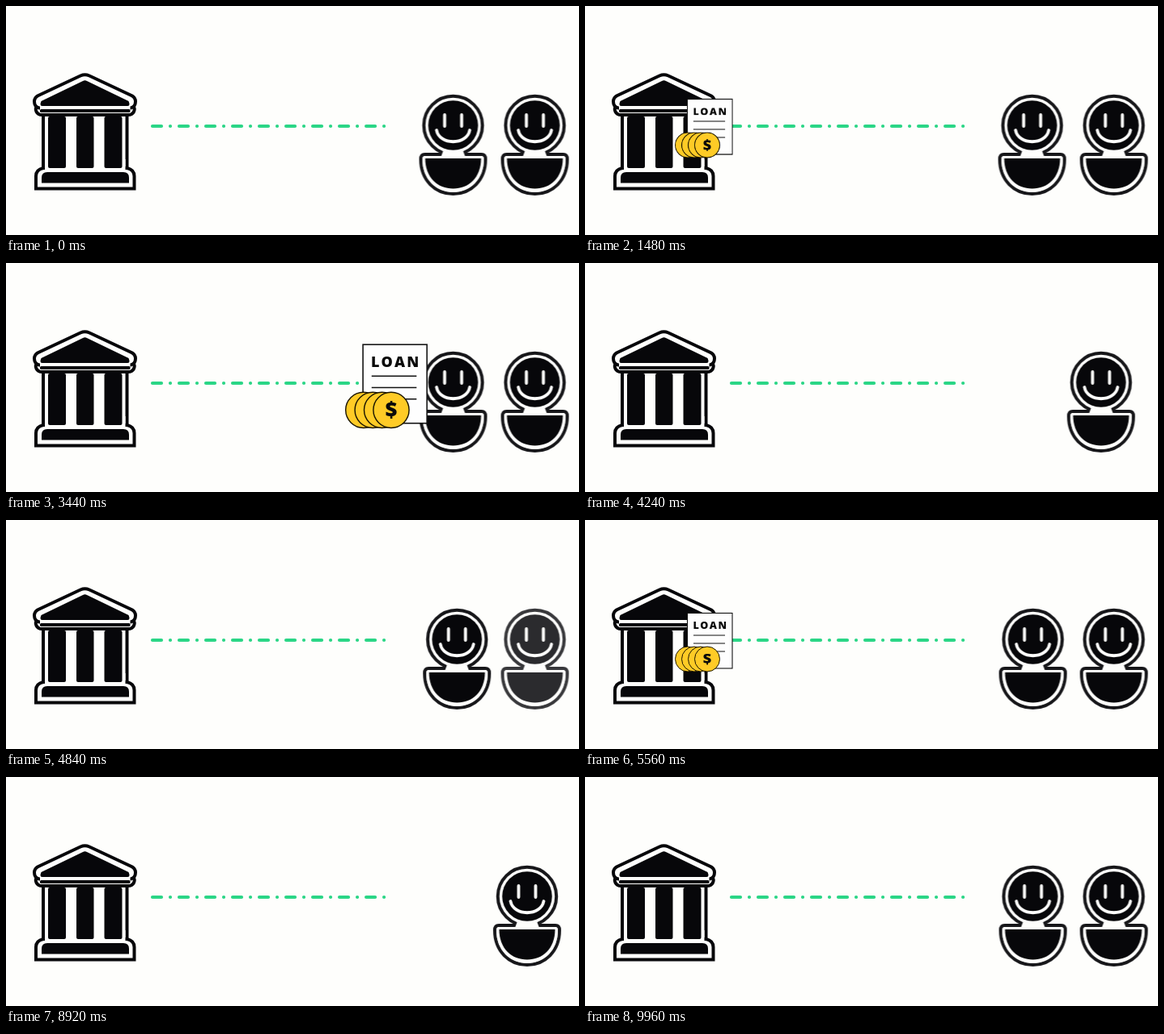
An HTML page for the animation above (10 s loop, 708 px wide and 284 px high).

```html
<!DOCTYPE html>
<html lang="en">
<head>
<meta charset="utf-8">
<title>Loan</title>
<style>
  :root { --paper: #fefefc; --ink: #07070a; --rim: #17171a; }
  html, body { margin: 0; width: 100%; height: 100%; overflow: hidden; background: var(--paper); }
  svg { display: block; width: 708px; height: 284px; }

  .ink { fill: var(--ink); }
  .line { fill: var(--paper); stroke: var(--ink); stroke-width: 4; }
  .rim { fill: var(--paper); stroke: var(--rim); stroke-width: 4; }
  .paper { fill: var(--paper); }
  .face { fill: none; stroke: var(--paper); stroke-width: 3.8; stroke-linecap: round; }
  .route { fill: none; stroke: #2bd686; stroke-width: 4.2; stroke-linecap: round; stroke-dasharray: 11 11 .01 11; }
  .sheet { fill: #fefefe; stroke: #111; stroke-width: 1.1; }
  .coin { fill: #ffcb26; stroke: #1c1600; stroke-width: 1; }
  text { font-family: "Open Sans", "Noto Sans", sans-serif; font-weight: 800; fill: #0a0a0a; }

  .move, .pop, .person { animation: 10s linear infinite; }
  .move { animation-name: move; }
  .pop { animation-name: pop; }
  .a { animation-name: a; }
  .b { animation-name: b; }
  .c { animation-name: c; }
  .d { animation-name: d; }

  @keyframes move {
    0% { transform: translate(147px, 152px); }
    21.65% { transform: translate(147px, 152px); animation-timing-function: cubic-bezier(.77, 0, .175, 1); }
    30.95%, 32.4% { transform: translate(460px, 152px); animation-timing-function: ease-in; }
    36%, 38.7% { transform: translate(487px, 155px); animation-timing-function: step-end; }
    40% { transform: translate(147px, 152px); }
    62.3% { transform: translate(147px, 152px); animation-timing-function: cubic-bezier(.77, 0, .175, 1); }
    71.6%, 72.9% { transform: translate(460px, 152px); animation-timing-function: ease-in; }
    76.5%, 100% { transform: translate(487px, 155px); }
  }
  @keyframes pop {
    0%, 10% { transform: scale(0); animation-timing-function: ease-out; }
    12.2% { transform: scale(1.6); animation-timing-function: ease-in-out; }
    14.5%, 32.4% { transform: scale(1); animation-timing-function: ease-out; }
    36% { transform: scale(1.57); animation-timing-function: ease-in; }
    38.6%, 50.9% { transform: scale(0); animation-timing-function: ease-out; }
    53.1% { transform: scale(1.6); animation-timing-function: ease-in-out; }
    55.4%, 72.9% { transform: scale(1); animation-timing-function: ease-out; }
    76.5% { transform: scale(1.57); animation-timing-function: ease-in; }
    79.6%, 100% { transform: scale(0); }
  }
  @keyframes a {
    0%, 38.4% { transform: translate(552.5px, 148px); opacity: 1; }
    40.4%, 100% { transform: translate(552.5px, 148px); opacity: 0; }
  }
  @keyframes b {
    0%, 41.8% { transform: translate(653.5px, 148px); opacity: 1; animation-timing-function: cubic-bezier(.25, .6, .4, 1); }
    51%, 82.5% { transform: translate(553.5px, 148px); opacity: 1; }
    84.8%, 100% { transform: translate(553.5px, 148px); opacity: 0; }
  }
  @keyframes c {
    0%, 45% { transform: translate(653.5px, 148px); opacity: 0; }
    49%, 88.8% { transform: translate(653.5px, 148px); opacity: 1; animation-timing-function: cubic-bezier(.25, .6, .4, 1); }
    99%, 100% { transform: translate(553.5px, 148px); opacity: 1; }
  }
  @keyframes d {
    0%, 92.5% { transform: translate(653.5px, 148px); opacity: 0; }
    97%, 100% { transform: translate(653.5px, 148px); opacity: 1; }
  }
</style>
</head>
<body>
<svg viewBox="0 0 708 284">
  <defs>
    <g id="person">
      <path class="rim" d="M-35 36H35Q40 36 40 42C40 68 22 85 0 85S-40 68-40 42Q-40 36-35 36Z"/>
      <circle class="rim" r="36.2"/>
      <path class="paper" d="M-34 38H34Q38 38 38 42C38 67 21 83 0 83S-38 67-38 42Q-38 38-34 38Z"/>
      <path class="paper" d="M-12 31H12L15 39H-15Z"/>
      <circle class="ink" r="30.8"/>
      <path class="ink" d="M-34.5 41H34.5C34.5 65 19 78.5 0 78.5S-34.5 65-34.5 41Z"/>
      <path class="face" d="M-10.5-13V1M10.5-13V1M-20.5 6C-17 25 17 25 20.5 6"/>
    </g>
  </defs>

  <path class="route" d="M181 149H467.5"/>

  <g id="bank">
    <path class="line" d="M46 130H149.5V206H46Z"/>
    <path class="line" d="M37 226.5V211Q37 203 46 201H149.5Q158.5 203 158.5 211V226.5Z"/>
    <path class="paper" d="M48 190H147.5V210H48Z"/>
    <path class="line" d="M39 124H156.500Q160 127 158 131Q156 135 151 135H44.500Q39.500 135 37.500 131Q35.500 127 39 124Z"/>
    <path class="line" d="M92 86.5Q97.5 84 103 86.5L156 111.5Q160 114 160 118.5Q160 125 154 126.5H41Q35 125 35 118.5Q35 114 39 111.5Z"/>
    <path class="paper" d="M42 122H153.5V133H42Z"/>
    <path class="ink" d="M95 93Q97.5 91.500 100 93L151.500 118Q154 124 150 124H45Q41 124 43.500 118Z"/>
    <rect class="ink" x="42" y="128" width="111.5" height="4" rx="1.5"/>
    <rect class="ink" x="52" y="137" width="22" height="64" rx="2"/>
    <rect class="ink" x="87" y="137" width="21.5" height="64" rx="2"/>
    <rect class="ink" x="121.5" y="137" width="22" height="64" rx="2"/>
    <path class="ink" d="M44 219.5V213Q44 206 51 206H145Q152 206 152 213V219.5Z"/>
  </g>

  <use href="#person" class="person d"/>
  <use href="#person" class="person c"/>
  <use href="#person" class="person b"/>
  <use href="#person" class="person a"/>

  <g class="move">
    <g class="pop">
      <rect class="sheet" x="-20.5" y="-36.5" width="55.5" height="68.5"/>
      <text x="-13.5" y="-17" font-size="12.6" letter-spacing="1.7">LOAN</text>
      <path class="sheet" d="M-13-9H26M-13 1H26M-13 11H26"/>
      <circle class="coin" cx="-20" cy="20.5" r="15.5"/>
      <circle class="coin" cx="-12" cy="20.5" r="15.5"/>
      <circle class="coin" cx="-4" cy="20.5" r="15.5"/>
      <circle class="coin" cx="4" cy="20.5" r="15.5"/>
      <text x="4" y="26.8" font-size="18" text-anchor="middle">$</text>
    </g>
  </g>
</svg>
</body>
</html>
```
